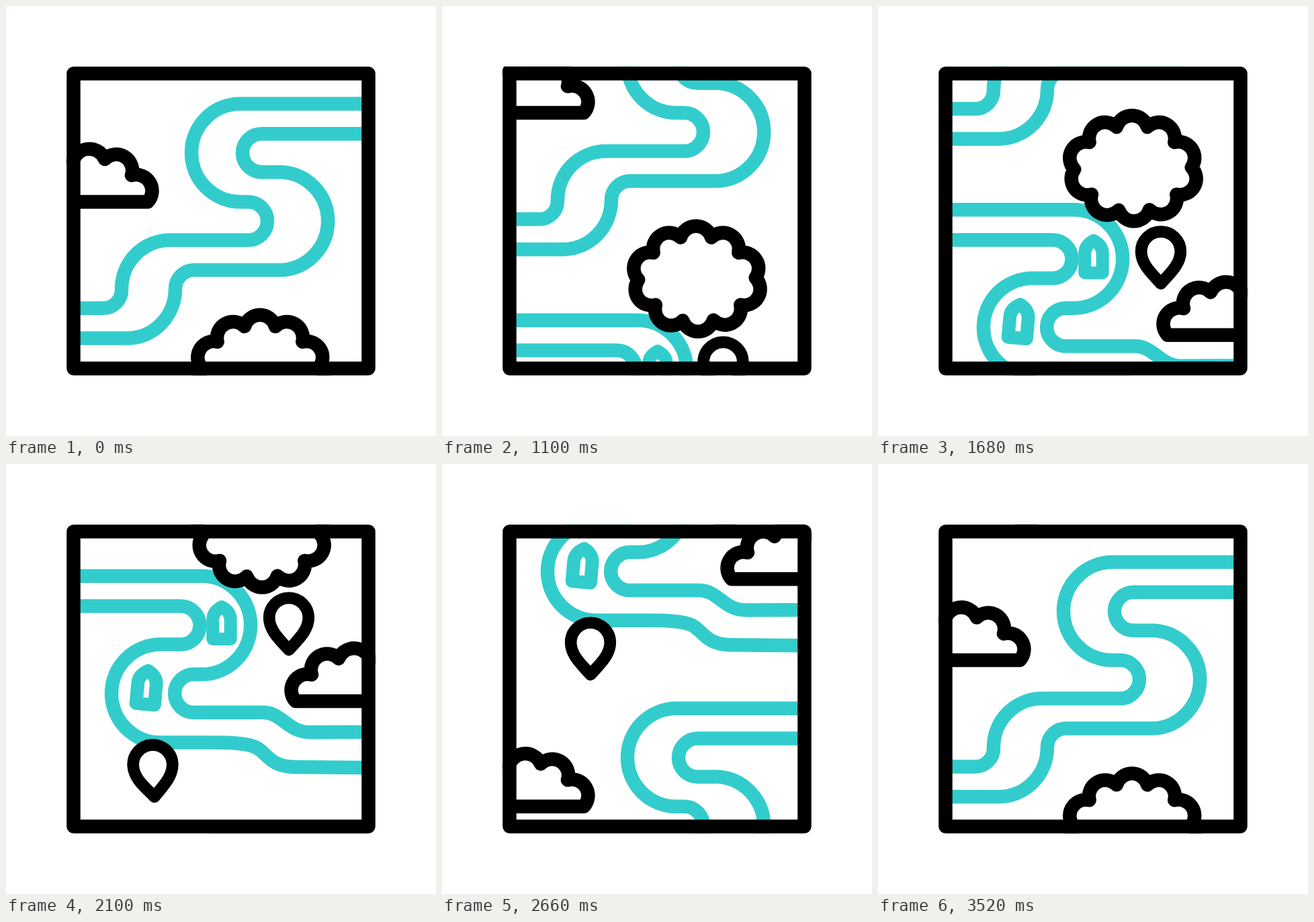
Recreate the animation shown at these times as an HTML page. Size 640x640 px, loop 3600 ms.

```html
<!DOCTYPE html>
<html lang="en">
<head>
<meta charset="utf-8">
<title>River map</title>
<style>
  html, body { margin: 0; width: 100%; height: 100%; overflow: hidden; background: #fff; }
  svg { display: block; width: 100vw; height: 100vh; }
  path, rect.frame { fill: none; stroke: #000; stroke-width: 20.5; stroke-linejoin: round; }
  .river path, .boat { stroke: #33cccc; }
  .boat { stroke-width: 19; }
  .pin { stroke-width: 17.7; }
</style>
</head>
<body>
<svg viewBox="0 0 640 640">
  <defs>
    <clipPath id="view"><rect x="90" y="89.9" width="460" height="460.2"/></clipPath>
    <path id="cloud" d="M99 236A25 25 0 0 1 147 228A24 24 0 0 1 187 252A24 24 0 0 1 211 291.5H99"/>
    <path id="boat" class="boat" d="M-13.2 24V-5Q-13.2 -17 0 -24Q13.2 -17 13.2 -5V24Z"/>
    <path id="pin" class="pin" d="M0 0C-12 -14 -29.3 -28 -29.3 -48A29.3 29.3 0 0 1 29.3 -48C29.3 -28 12 -14 0 0Z"/>
    <g id="map">
      <g class="river">
        <path d="M540 145.5H349A73 73 0 0 0 349 291.5H360.5A28.5 28.5 0 0 1 360.5 348.5H244A72 72.5 0 0 0 172 421V422.5A27 27 0 0 1 145 449.8H100"/>
        <path d="M540 190.2H380.5A28.5 28.5 0 0 0 380.5 247.2H410A73 73 0 0 1 410 393H280A28 28 0 0 0 252 421A72 73.5 0 0 1 180 494.6H100"/>
        <path d="M100 600.2H291A73 73 0 0 1 291 746.5H279.5A28.3 28.3 0 0 0 279.5 803.2H382C412 803.2 418 832.7 453 832.7L540 832.3"/>
        <path d="M100 645H260A28.5 28.5 0 0 1 260 702H230A73 73 0 0 0 230 848H305C340 848 358 849.3 371 854.7C388 862 392 884.4 430 884.4L540 885.5"/>
      </g>
      <use href="#boat" x="321" y="670"/>
      <use href="#boat" transform="translate(209.5 766) rotate(5) scale(1.04)"/>
      <use href="#cloud"/>
      <use href="#cloud" transform="translate(642 495) scale(-1 1)"/>
      <path d="M355 477A24 24 0 0 1 401 477A24 24 0 0 1 441.3 499.7A24 24 0 0 1 466.7 537A24 24 0 0 1 444.3 577.3A24 24 0 0 1 404 600A24 24 0 0 1 358.3 600.7A24 24 0 0 1 318 577.3A24 24 0 0 1 292.3 540A24 24 0 0 1 314.7 499.7A24 24 0 0 1 355 477Z"/>
      <use href="#pin" id="pinA"/>
      <use href="#pin" id="pinB"/>
    </g>
  </defs>
  <g clip-path="url(#view)">
    <g id="scroll">
      <use href="#map"/>
      <use href="#map" y="833.5"/>
    </g>
  </g>
  <rect class="frame" x="100.5" y="100.5" width="439" height="439"/>
</svg>
<script>
  const LOOP = 3600, STEP = 20, LAST = 3520;
  const byId = id => document.getElementById(id);
  const scroll = byId('scroll'), pinA = byId('pinA'), pinB = byId('pinB');

  function ease(u) {
    u = Math.min(Math.max(u, 0), 1);
    return u * u * (3 - 2 * u);
  }

  // Each pin arrives leaning and straightens about its tip.
  function placePin(pin, x, y, t) {
    const lean = -3 * (1 - ease(t / 400));
    pin.setAttribute('transform', `translate(${x} ${y}) rotate(${lean})`);
  }

  function draw(now) {
    const t = Math.min(Math.floor((now % LOOP) / STEP) * STEP, LAST);
    // The loop closes before the ease has fully slowed down.
    const y = t < 140 ? 0 : 893.3 * ease((t - 118) / 4044);
    scroll.setAttribute('transform', `translate(0 ${-y})`);
    placePin(pinA, 421, 710, t - 1100);
    placePin(pinB, 221, 928.7, t - 2100);
  }

  const start = performance.now();
  function tick() {
    draw(performance.now() - start);
    requestAnimationFrame(tick);
  }
  tick();
</script>
</body>
</html>
```
